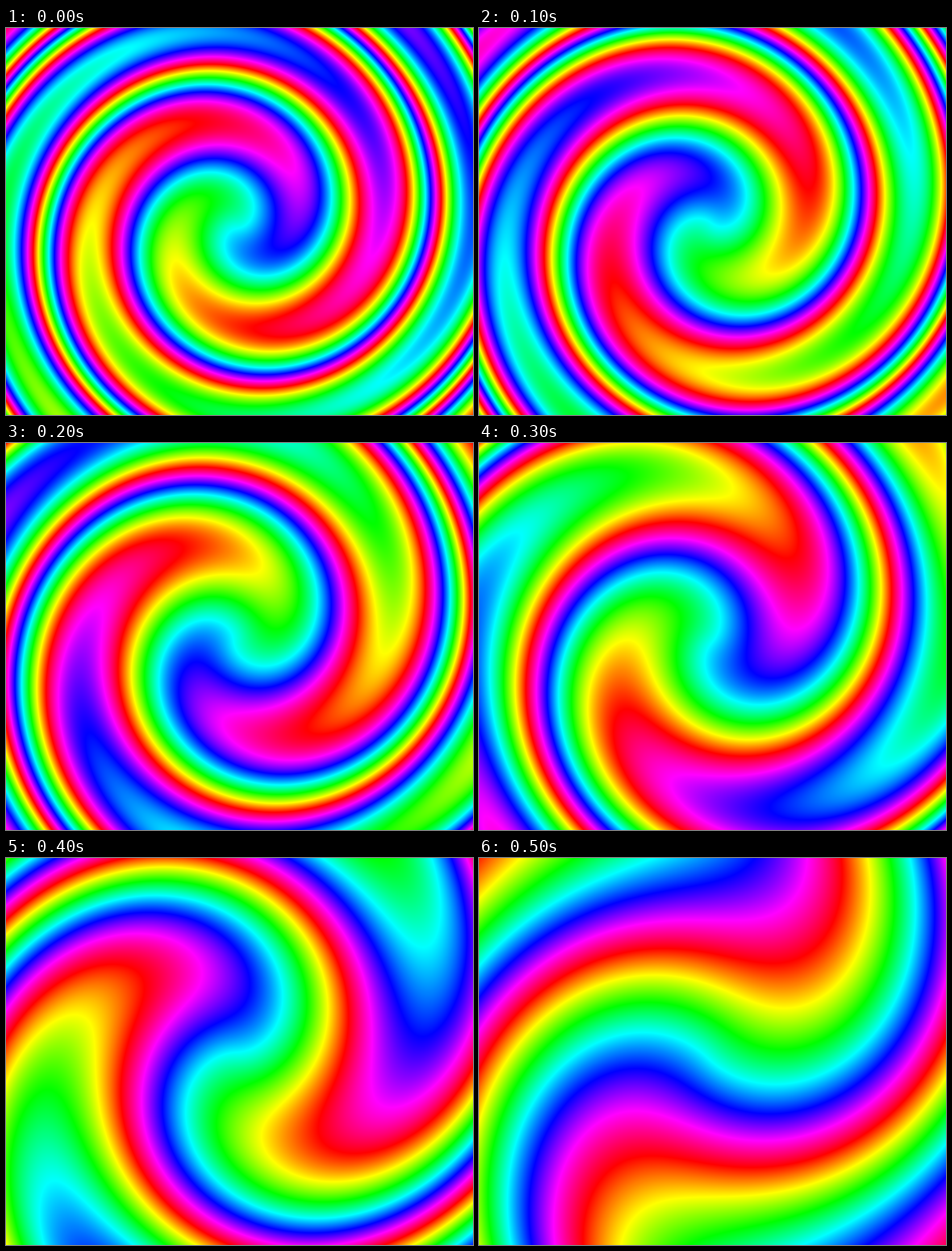
Write an HTML page with a canvas that moves like this. It is 822x681 px and loops after 0.6 s.

```html
<!DOCTYPE html>
<html lang="en">
<head>
<meta charset="utf-8">
<title>Rainbow swirl</title>
<style>
  html, body { margin: 0; width: 100%; height: 100%; overflow: hidden; }
  canvas { display: block; width: 100%; height: 100%; }
</style>
</head>
<body>
<canvas id="stage" width="822" height="681"></canvas>
<script>
const W = 822, H = 681, STEPS = 6, HOLD = 100;
const CX = 406, CY = 347.5;
const RAD = Math.PI / 180;
const TURN = 133.9 * RAD;    // rotation at the centre per unit of twist
const FALL = 0.18 * RAD;     // rotation lost per pixel of radius
const PERIOD = 365;          // pixels per full hue cycle
const MID_HUE = 0.485;
const SHADES = 1536;

const ctx = document.getElementById("stage").getContext("2d");

// Fully saturated hue wheel as packed ABGR
const wheel = Uint32Array.from({ length: SHADES }, (_, i) => {
  const channel = shift => {
    const k = (shift + i * 6 / SHADES) % 6;
    return Math.round(255 * (1 - Math.max(0, Math.min(k, 4 - k, 1))));
  };
  return (255 << 24 | channel(1) << 16 | channel(3) << 8 | channel(5)) >>> 0;
});

// A horizontal rainbow, twisted about the centre
function swirl(twist) {
  const image = ctx.createImageData(W, H);
  const pixels = new Uint32Array(image.data.buffer);
  for (let j = 0, p = 0; j < H; j++) {
    const y = j + 0.5 - CY;
    for (let i = 0; i < W; i++) {
      const x = i + 0.5 - CX;
      const a = twist * (TURN - FALL * Math.sqrt(x * x + y * y));
      const hue = MID_HUE + (x * Math.cos(a) + y * Math.sin(a)) / PERIOD;
      pixels[p++] = wheel[Math.floor((hue - Math.floor(hue)) * SHADES) % SHADES];
    }
  }
  return image;
}

// The twist unwinds by one unit per step
const poses = Array.from({ length: STEPS }, (_, n) => swirl(STEPS - n));
let start, shown = 0;
ctx.putImageData(poses[0], 0, 0);

function draw(now) {
  start ??= now;
  const step = Math.floor((now - start) / HOLD) % STEPS;
  if (step !== shown) ctx.putImageData(poses[shown = step], 0, 0);
  requestAnimationFrame(draw);
}
requestAnimationFrame(draw);
</script>
</body>
</html>
```
